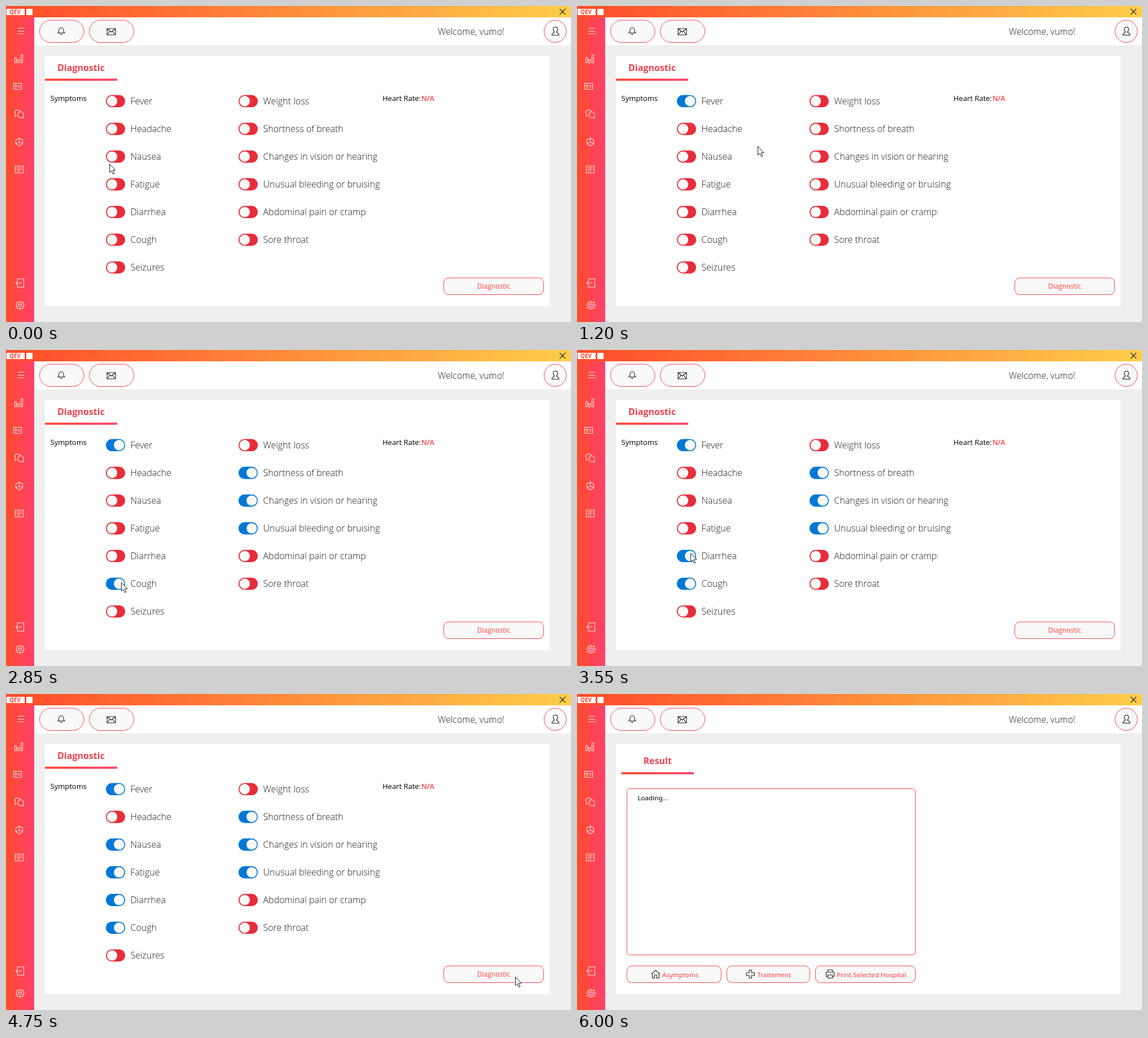
Write an HTML page that moves like this. It is 1001x559 px and loops after 8 s.

```html
<!DOCTYPE html>
<html lang="en">
<head>
<meta charset="utf-8">
<title>Diagnostic</title>
<style>
  html, body { margin: 0; width: 100%; height: 100%; overflow: hidden; background: #efefef; }
  svg { display: block; width: 1001px; height: 559px; font-family: "Open Sans", "Noto Sans", sans-serif; }
  .light { font-size: 16px; font-weight: 300; fill: #1c1c1c; }
  .tab { font-size: 16px; font-weight: 700; fill: #f5414f; }
  .small { font-size: 13px; }
  .narrow { font-family: "Noto Sans", "Open Sans", sans-serif; font-size: 11.6px; }
  .red { fill: #f6403a; }
  .button { fill: #f9f9f9; stroke: #fb4450; }
  .icon { fill: none; stroke: #222; stroke-width: 1.1; }
  .side { fill: none; stroke: #ffe3de; stroke-width: 1.1; }
</style>
</head>
<body>
<svg id="stage" viewBox="0 0 1001 559" xmlns="http://www.w3.org/2000/svg">
  <defs>
    <linearGradient id="warm"><stop stop-color="#ff4b2b"/><stop offset="1" stop-color="#ff416c"/></linearGradient>
    <linearGradient id="sun"><stop stop-color="#ff4b2b"/><stop offset="1" stop-color="#ffcd4a"/></linearGradient>
    <clipPath id="cut"><rect x="450" y="340" width="189" height="50"/></clipPath>
  </defs>

  <rect width="1001" height="559" fill="#efefef"/>
  <rect x="50" y="20" width="951" height="49.5" fill="#fff"/>
  <rect y="19" width="50" height="540" fill="url(#warm)"/>
  <rect width="1001" height="20" fill="url(#sun)"/>

  <rect x="1" y="5" width="32" height="11" fill="#fff"/>
  <text x="6" y="14.2" font-size="10" font-weight="700" fill="#fa4632">QEV</text>
  <rect x="36" y="5" width="11" height="11" fill="#fff"/>
  <path class="icon" d="M981 5l10 10M991 5l-10 10"/>

  <rect class="button" x="59.5" y="25" width="78.5" height="39.5" rx="19.7"/>
  <rect class="button" x="147.5" y="25" width="79" height="39.5" rx="19.7"/>
  <circle class="button" cx="973" cy="44.8" r="19.7"/>
  <path class="icon" d="M92 47.8c2-1.6 2-3 2-5.6a3.9 3.9 0 0 1 7.8 0c0 2.6 0 4 2 5.6zM96.2 49a1.8 1.8 0 0 0 3.4 0"/>
  <path class="icon" d="M179 40h15v11h-15zl7.500 6 7.500-6M179 51l5.500-6.500M194 51l-5.500-6.500"/>
  <path class="icon" d="M971.500 45.500c-3-2.500-2.500-8.300 2-8.300s5 5.800 2 8.300v1.200c2 1 4.300 1.200 4.300 4.800h-12.600c0-3.600 2.300-3.800 4.300-4.800z"/>
  <text class="light" x="765" y="50.500">Welcome, vumo!</text>

  <g class="side">
    <path d="M20.500 39.500h11.500M20.500 44.500h11.500M20.500 49h11.500"/>
    <path d="M15.500 91.500h3v9h-3zM20.500 94.500h3v6h-3zM26.500 86.500h3v14h-3z"/>
    <path d="M13.500 136.500h14v11h-14zM16 140h3v2h-3zM21 140.500h4.500M21 143.500h4.500M16 145h3"/>
    <path d="M19 194l-3 1 .8-3a5 5 0 1 1 8.500-5M31 198.500l-1-3a5.200 5.200 0 1 0-3 1.800z"/>
    <path d="M23.500 233.500l6 3.500v7l-6 3.500-6-3.500v-7zM23.500 233.500v7l6 3.500M23.500 240.500l-6 3.500"/>
    <path d="M16.500 283h14v12.500h-14zM19 286.500h9M19 289.500h9M19 292.500h6"/>
    <path d="M20.500 486v-3.500h11v15h-11v-3.500M28 490h-10.500M21 486.500l-3.500 3.500 3.500 3.500"/>
    <path id="gear"/><circle cx="25" cy="529.500" r="2.600"/>
  </g>

  <rect x="69" y="88" width="894" height="442.500" fill="#fff"/>

  <g id="form">
    <text class="tab" x="91" y="115">Diagnostic</text>
    <rect x="69" y="128.500" width="128" height="3.800" fill="url(#warm)"/>
    <text class="small" x="78.500" y="168">Symptoms</text>
    <text class="small" x="667" y="168">Heart Rate:</text>
    <text class="small" x="736" y="168" fill="#f00">N/A</text>
    <g id="list"></g>
    <rect class="button" x="775.500" y="481" width="177" height="29.500" rx="9"/>
    <text class="red" x="864" y="500" font-size="12" text-anchor="middle">Diagnostic</text>
  </g>

  <g id="result">
    <text class="tab" x="117.500" y="124">Result</text>
    <rect x="79" y="138.300" width="128" height="3.800" fill="url(#warm)"/>
    <rect id="box" x="88.500" y="167.500" width="511" height="294" rx="5" fill="#fff"/>
    <text class="narrow" x="107.500" y="188">Loading...</text>
    <rect class="button" x="88.500" y="481" width="167" height="29.500" rx="9"/>
    <rect class="button" x="265.500" y="481" width="147" height="29.500" rx="9"/>
    <rect class="button" x="422.500" y="481" width="177" height="29.500" rx="9"/>
    <path class="icon" d="M132 495.500l7.300-7 7.300 7M133.500 494.500v8h4v-5.500h3.800v5.500h4v-8"/>
    <path class="icon" d="M305 488.500h4.500v4.700h5v4.600h-5v4.700h-4.500v-4.700h-5v-4.600h5z"/>
    <path class="icon" d="M444.500 492v-4h8v4M444.500 499.500h-3v-7.500h14v7.500h-3M444.500 497h8v5.500h-8z"/>
    <text class="narrow red" x="151" y="500.500">Asymptoms</text>
    <text class="narrow red" x="319.500" y="500.500">Traitement</text>
    <text class="narrow red" x="460" y="500.500">Print Selected Hospital</text>
  </g>

  <path id="arrow" d="M.5 .5v15.200l3.500-3.200 2.500 5.700 2.400-1-2.500-5.600h4.700z" fill="#fff" stroke="#222"/>
  <path id="beam" d="M-3.500-7.500h2.500l1 1 1-1h2.500M0-6.500v13M-3.500 7.500h2.500l1-1 1 1h2.500" fill="none" stroke="#111" stroke-width="1.200"/>
</svg>
<script>
const LOOP = 8000, STEP = 50, PAGE_TURN = 4850, CURSOR_GONE = 6000;
const $ = id => document.getElementById(id);

// Label and the time its switch turns on
const columns = [
  { x: 177, items: [["Fever", 1000], ["Headache"], ["Nausea", 4000], ["Fatigue", 3750],
                    ["Diarrhea", 3250], ["Cough", 2750], ["Seizures"]] },
  { x: 412, items: [["Weight loss"], ["Shortness of breath", 2150], ["Changes in vision or hearing", 1950],
                    ["Unusual bleeding or bruising", 1700], ["Abdominal pain or cramps"], ["Sore throat"]] }
];

// Cursor path: time, x, y
const path = [
  [0, 183, 279], [750, 205, 171], [1000, 205, 171], [1200, 320, 248], [1550, 444, 318],
  [1700, 444, 318], [1900, 440, 270], [1950, 440, 270], [2150, 447, 211], [2200, 448, 207],
  [2500, 223, 397], [2750, 204, 418], [2800, 204, 418], [3050, 203, 352], [3250, 203, 352],
  [3350, 201, 359], [3550, 201, 359], [3700, 203, 314], [3800, 203, 314], [4000, 203, 270],
  [4100, 203, 270], [4350, 685, 480], [4550, 880, 516], [4750, 902, 500], [4900, 902, 500],
  [5200, 377, 436], [5400, 250, 470], [5750, 186, 512], [6000, 147, 559]
];

const switches = [];
for (const { x, items } of columns) {
  items.forEach(([label, on = Infinity], row) => {
    const y = 168.3 + row * 49.03;
    const clip = label.startsWith("Abdominal") ? ' clip-path="url(#cut)"' : "";
    $("list").insertAdjacentHTML("beforeend",
      `<g><rect x="${x}" y="${y - 10.8}" width="34" height="21.6" rx="10.8"/>
       <circle cy="${y}" r="9.2" fill="#f9f9f9"/>
       <text class="light" x="${x + 43.5}" y="${Math.round(y + 5.8)}"${clip}>${label}</text></g>`);
    const [track, knob] = $("list").lastElementChild.children;
    switches.push({ x, on, track, knob });
  });
}

const teeth = [];
for (let i = 0; i < 32; i++) {
  const r = i % 4 < 2 ? 7.3 : 5.7, a = (i - 0.5) * Math.PI / 16;
  teeth.push(`${(25 + r * Math.cos(a)).toFixed(2)} ${(529.5 + r * Math.sin(a)).toFixed(2)}`);
}
$("gear").setAttribute("d", `M${teeth.join("L")}z`);

// Monotone cubic interpolation along one axis
const slope = (i, k) => path[i + 1] && path[i]
  ? (path[i + 1][k] - path[i][k]) / (path[i + 1][0] - path[i][0]) : 0;
function tangent(i, k) {
  const a = slope(i - 1, k), b = slope(i, k);
  return a * b > 0 ? 2 * a * b / (a + b) : 0;
}
function along(t, k) {
  const i = Math.max(0, path.findIndex(p => p[0] > t) - 1);
  const [a, b] = [path[i], path[i + 1]];
  const d = b[0] - a[0], u = (t - a[0]) / d, v = 1 - u;
  return v * v * (1 + 2 * u) * a[k] + u * u * (1 + 2 * v) * b[k]
    + d * u * v * (v * tangent(i, k) - u * tangent(i + 1, k));
}

const show = (el, on) => el.setAttribute("visibility", on ? "visible" : "hidden");

function draw(t) {
  for (const s of switches) {
    const on = t >= s.on;
    s.track.setAttribute("fill", on ? "#0078d7" : "#e92c3a");
    s.knob.setAttribute("cx", s.x + (on ? 23.3 : 10.9));
  }
  const turned = t >= PAGE_TURN, seen = t < CURSOR_GONE;
  show($("form"), !turned);
  show($("result"), turned);

  let hover = false;
  if (seen) {
    const x = Math.round(along(t, 1)), y = Math.round(along(t, 2));
    hover = turned && x > 88 && x < 600 && y > 167 && y < 462;
    for (const id of ["arrow", "beam"]) $(id).setAttribute("transform", `translate(${x} ${y})`);
  }
  show($("arrow"), seen && !hover);
  show($("beam"), hover);
  $("box").setAttribute("stroke", hover ? "#a0a0a0" : "#fb4450");
}

const start = performance.now();
function tick() {
  const t = (performance.now() - start) % LOOP;
  draw(Math.floor(t / STEP) * STEP);
  requestAnimationFrame(tick);
}
tick();
</script>
</body>
</html>
```
